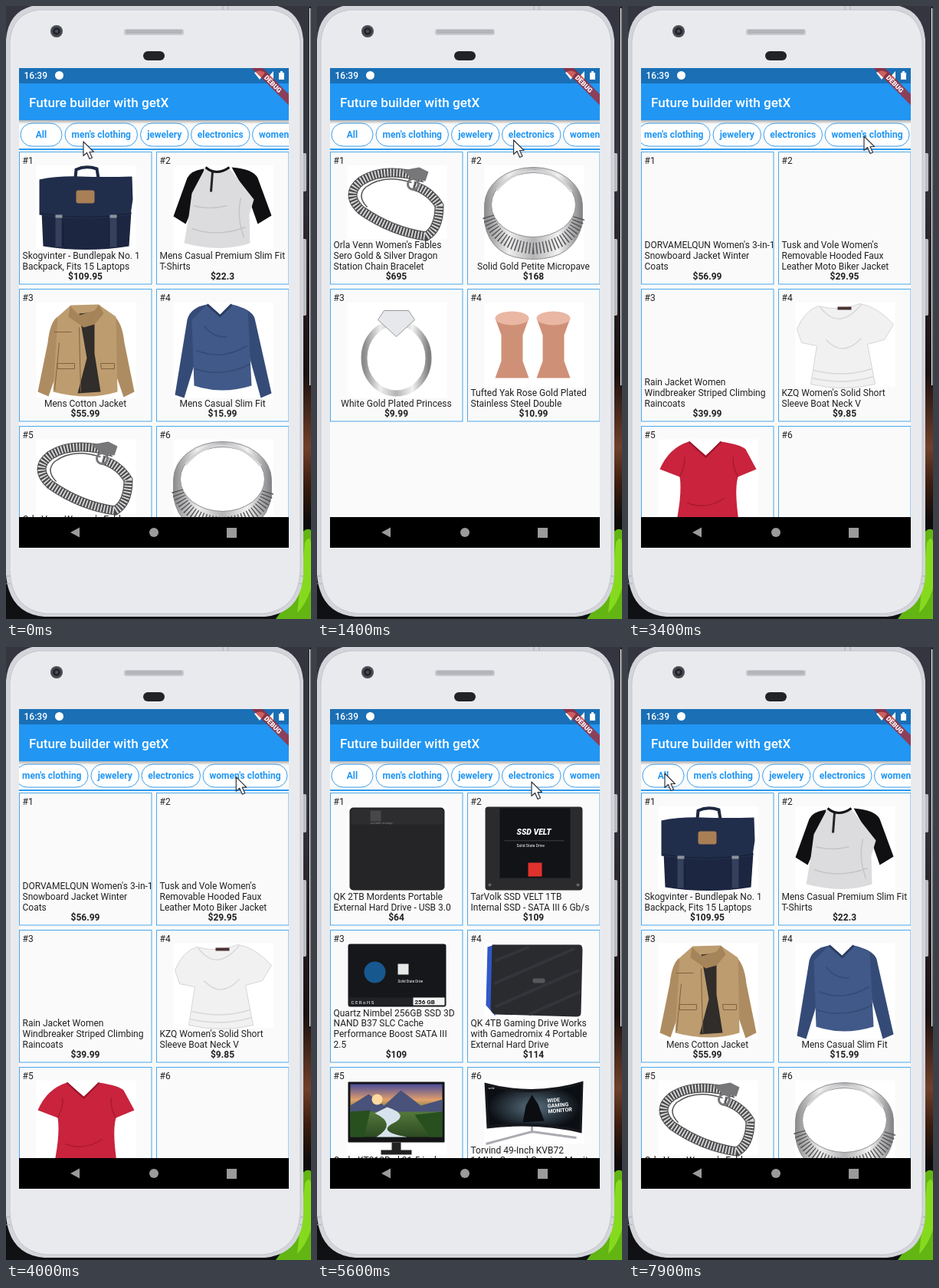
An HTML page that plays this animation: 398x800 px, repeating every 8 s.

```html
<!DOCTYPE html>
<html lang="en">
<head>
<meta charset="utf-8">
<title>Shop grid</title>
<style>
html, body { margin: 0; width: 100%; height: 100%; overflow: hidden; background: #17181c; }
svg { display: block; width: 398px; height: 800px; font-family: Roboto, sans-serif; font-size: 12px; }
.bold { font-weight: 700; }
.mid { text-anchor: middle; }
.card { fill: #fafafa; stroke: #4ba8ec; }
</style>
</head>
<body>
<svg viewBox="0 0 398 800">
  <defs>
    <clipPath id="screen"><rect x="17" y="81" width="352" height="626"/></clipPath>
    <linearGradient id="side" x2="0" y2="1">
      <stop offset="0" stop-color="#34353f"/><stop offset=".25" stop-color="#34353f"/>
      <stop offset=".6" stop-color="#1a1010"/><stop offset=".72" stop-color="#70402a"/>
      <stop offset=".78" stop-color="#3a1d10"/><stop offset=".84" stop-color="#0d0b0a"/><stop offset="1" stop-color="#101114"/>
    </linearGradient>
    <linearGradient id="shade" x2="0" y2="1"><stop stop-color="#000" stop-opacity=".3"/><stop offset="1" stop-color="#000" stop-opacity="0"/></linearGradient>
    <linearGradient id="silver"><stop stop-color="#8b8b8d"/><stop offset=".25" stop-color="#eee"/><stop offset=".5" stop-color="#b4b4b6"/><stop offset=".75" stop-color="#f2f2f2"/><stop offset="1" stop-color="#808083"/></linearGradient>
    <linearGradient id="sky" x2="0" y2="1"><stop stop-color="#4a4b9a"/><stop offset=".3" stop-color="#e3a06a"/><stop offset=".5" stop-color="#567a3c"/><stop offset="1" stop-color="#2c4a22"/></linearGradient>
    <radialGradient id="glow"><stop stop-color="#58707f"/><stop offset="1" stop-color="#0b0e13"/></radialGradient>
  </defs>

  <rect width="398" height="800" fill="url(#side)"/>
  <path d="M396 2H398V496H396" fill="#fff" stroke="#0a0a0a" stroke-width="1.5"/>
  <path d="M386 688Q392 680 398 684V800H352Q384 760 386 688Z" fill="#62b512"/>
  <path d="M390 700Q396 690 398 700V760Q392 780 380 792Z" fill="#86da1e"/>

  <path d="M386 192h4.500q1.500 0 1.500 2v46q0 2-1.500 2H386zM386 304h4.500q1.500 0 1.500 2v96q0 2-1.500 2H386z" fill="#b9bbc1"/>
  <path d="M0 44Q3 8 34 0H354Q385 8 388 44V740Q386 792 338 797H50Q4 793 0 742Z" fill="#d3d5db"/>
  <path d="M5 46Q8 10 42 5H346Q380 9 384 46V738Q381 788 336 793H52Q8 788 5 738Z" fill="#e9eaee" stroke="#c2c4cb"/>
  <path d="M0 744h5M384 744h4M0 754h6M383 754h4M283 0v5M290 0v5" stroke="#a9abb3"/>
  <circle cx="66" cy="33" r="8" fill="#4a4c52"/><circle cx="66" cy="33" r="5" fill="#23252b"/><circle cx="66" cy="33" r="2" fill="#4b5365"/>
  <rect x="154" y="30" width="78" height="8" rx="3" fill="#c8c9ce"/><rect x="156" y="31" width="74" height="5" rx="2" fill="#b4b5bb"/>
  <rect x="179" y="59" width="28" height="12" rx="6" fill="#222326"/>

  <g clip-path="url(#screen)">
    <rect x="17" y="81" width="352" height="626" fill="#fafafa"/>
    <g id="grid"></g>
    <rect x="17" y="149" width="352" height="38" fill="#fafafa"/>
    <g id="chips"></g>
    <rect x="17" y="186" width="352" height="2" fill="#2c9af1"/>
    <rect x="17" y="149" width="352" height="5" fill="url(#shade)"/>
    <rect x="17" y="101" width="352" height="48" fill="#2196f3"/>
    <rect x="17" y="81" width="352" height="20" fill="#1a6fb5"/>
    <g fill="#fff">
      <text x="23.500" y="95" font-weight="500">16:39</text>
      <circle cx="69.500" cy="90.500" r="5.500"/>
      <path d="M324 87q7-5 14 0l-7 9zM349 85v11h-10zM356 87h2v-2h3v2h2v9h-7z"/>
      <text x="30" y="132" font-size="17.140" font-weight="500">Future builder with getX</text>
    </g>
    <g transform="translate(369 81) rotate(45)">
      <rect x="-34" y="24" width="68" height="10.300" fill="#b71c1c" fill-opacity=".7"/>
      <text class="mid" y="32.300" font-size="8.740" font-weight="900" fill="#fff">DEBUG</text>
    </g>
    <rect x="17" y="667" width="352" height="40" fill="#000"/>
    <path d="M84 687L96 680.500V693.500ZM288 681h13v13h-13z" fill="#9b9b9b"/><circle cx="193" cy="687" r="6" fill="#9b9b9b"/>
  </g>
  <path id="cursor" d="M0 0V18.500L4.500 14.500 8 22.500 11.500 21 8 13.500H13.500Z" fill="#fff" stroke="#33343c" stroke-width="1.200" stroke-linejoin="round"/>
</svg>

<script>
const LOOP = 8000, STEP = 100;
const $ = id => document.getElementById(id);
const shape = (d, fill, more = '') => `<path d="${d}" fill="${fill}" ${more}/>`;
const line = (d, color, width = 1, more = '') => shape(d, 'none', `stroke="${color}" stroke-width="${width}" ${more}`);
const box = (x, y, w, h, fill, rx = 0) => `<rect x="${x}" y="${y}" width="${w}" height="${h}" rx="${rx}" fill="${fill}"/>`;
const label = (x, y, text, size, more = '') => `<text x="${x}" y="${y}" font-size="${size}" fill="#fff" ${more}>${text}</text>`;

// Pictures are drawn in card coordinates
const art = {
  bag: line('M73 34L74 23Q87 17 101 22L103 34', '#1d2842', 4) +
    shape('M29 78L31 123Q87 132 143 123L146 78Z', '#1c2640') +
    shape('M26 36Q50 31 80 32T147 32L148 62 145 82Q85 92 26 82Z', '#212e4b') +
    line('M27 80Q85 90 146 80M57 92V122M117 92V122', '#141c31') +
    box(47, 82, 8, 42, '#34405c') + box(118, 82, 9, 42, '#34405c') +
    box(47, 82, 9, 4, '#8d929c') + box(118, 82, 9, 4, '#8d929c') + box(74, 50, 24, 17, '#a97f55', 3),
  raglan: shape('M62 22Q45 24 40 34L22 84 38 94Q46 74 56 58Z', '#101012') +
    shape('M98 20Q126 22 132 34L150 83 132 94 120 60Z', '#101012') +
    shape('M64 20L46 54 42 84 36 119Q85 132 122 119L121 82 127 62 94 20Q78 28 64 20Z', '#dcdcde') +
    line('M64 20Q78 32 95 20', '#151517', 3) + line('M73 26L71 52', '#252528', 3) +
    line('M48 70Q70 76 92 70M46 100Q80 112 116 98M110 60Q104 84 114 112', '#c5c5c8', 1.5),
  jacket: shape('M50 36Q40 42 37 70L24 134 38 140 56 88Z', '#ae8c61') +
    shape('M122 34Q134 42 137 70L150 134 136 141 118 88Z', '#ae8c61') +
    shape('M50 36L67 21 103 20 126 36 128 134Q90 146 44 134Z', '#bd9c70') +
    shape('M78 32L98 30 98 84 106 134 76 136 88 90Z', '#302d2a') +
    shape('M66 22L78 34 98 28 104 20 110 32 98 46 84 50 64 36Z', '#a58459') +
    line('M45 56H68M49 97H72V104H50ZM106 97H124V104H107ZM52 70L46 132M78 50L80 134', '#7f623f'),
  sweater: shape('M66 20Q44 24 40 40L24 138 36 142 58 70Z', '#354b77') +
    shape('M98 20Q124 26 128 38L150 136 136 142 116 70Z', '#354b77') +
    shape('M66 20L83 34 98 20 119 28 124 126Q85 138 49 126L46 40Z', '#405988') +
    line('M66 20L83 35 98 20', '#2a3c62', 3) +
    line('M52 80Q85 94 118 74M50 104Q85 116 122 98M62 48Q74 64 92 62', '#344a75', 1.500),
  bracelet: ['#4c4c4e', '#d9d9da'].map((c, i) =>
    line('M123 34Q70 18 40 38Q18 55 40 76Q80 104 125 110Q142 100 142 70Q130 50 108 44', c, 12 - 2 * i, i ? 'stroke-dasharray="1.800 2.200"' : '')).join('') +
    line('M106 40Q70 28 46 46Q34 58 48 72', '#555', 1.500) + '<circle cx="108" cy="42" r="7" fill="none" stroke="#77777a" stroke-width="3"/>' +
    shape('M94 24L116 20 128 26 124 38 106 34Z', '#77777a'),
  ring: shape('M22 70A64 50 0 0 1 150 70V92Q140 140 86 140Q30 140 22 92Z', 'url(#silver)', 'stroke="#8d8d90"') +
    '<ellipse cx="86" cy="69" rx="55" ry="42" fill="#fff" stroke="#8f8f92"/>' +
    line('M27 84Q38 122 86 126Q136 122 146 84', '#58585b', 15, 'stroke-dasharray="1.500 3"') +
    line('M38 50Q60 24 86 25Q114 25 136 52', '#d4d4d6', 3),
  gem: '<ellipse cx="86" cy="90" rx="42" ry="46" fill="none" stroke="url(#silver)" stroke-width="8"/>' +
    shape('M70 28H102L110 40 86 62 62 40Z', '#e6e8ec', 'stroke="#98989c"'),
  plugs: [58, 112].map(x => shape(`M${x - 22} 38h44l-8 22v34l8 22h-44l8-22V60z`, '#cf9078') +
    `<ellipse cx="${x}" cy="38" rx="22" ry="9" fill="#e9b7a3"/>`).join(''),
  whiteTee: shape('M52 22Q34 28 24 52L30 70 50 74 42 124Q85 134 126 124L116 72 138 66 150 46Q128 22 106 19Q80 30 52 22Z', '#f1f1f2', 'stroke="#d6d6d8"') +
    line('M54 23Q78 56 108 20M46 106Q84 116 122 104M44 116Q84 126 124 114M62 66Q84 90 108 64', '#d8d8da', 1.500) + box(77, 23, 18, 4, '#4a3332'),
  redTee: shape('M62 20L84 38 104 20Q130 24 136 30L150 56 126 66Q120 86 130 142H42Q54 90 50 66L24 56Q36 28 62 20Z', '#c9233d') +
    line('M62 20L84 40 104 20', '#99152b', 2) + line('M50 66Q58 50 56 40M126 66Q118 52 120 40M60 100Q84 110 108 94', '#aa1a31', 1.500),
  drive: box(25, 19, 124, 108, '#252527', 5) + box(27, 21, 120, 20, '#2d2d30', 3) + box(52, 23, 14, 14, '#47474a') + label(52, 40, 'portable storage', 4, 'opacity=".4"'),
  ssd: box(23, 18, 127, 109, '#2b2b2e', 4) + box(42, 20, 92, 91, '#121316') +
    '<circle cx="29" cy="120" r="2" fill="#666"/><circle cx="144" cy="120" r="2" fill="#666"/>' +
    label(64, 54, 'SSD VELT', 10.500, 'font-weight="800" font-style="italic"') + label(64, 70, 'Solid State Drive', 5) +
    box(48, 62, 78, .7, '#555') + box(79, 91, 18, 18, '#e0322d'),
  ssd256: box(23, 18, 128, 82, '#15171a', 3) + '<circle cx="58" cy="55" r="14" fill="#17588f"/>' +
    box(88, 44, 14, 14, '#e8e8e8') + label(88, 68, 'Solid State Drive', 4.500) + box(24, 88, 126, 10, '#202225') +
    box(108, 88, 41, 10, '#f4f4f4') + label(110, 96.500, '256 GB', 8, 'class="bold" style="fill:#111"') + label(27, 96, 'C E  R o H S', 6),
  gameDrive: shape('M26 22L36 19V112L24 98Z', '#3157c9') + shape('M32 19H146Q150 19 150 26L148 108Q148 113 142 113L36 110Q30 108 30 100Z', '#2a2b2e') +
    line('M36 40L80 22M34 70L140 24M36 100L146 52M80 110L148 80', '#34353a', 4) + box(85, 63, 16, 6, '#56575b', 2),
  monitor: box(23, 19, 126, 79, '#141416', 1) + box(26, 22, 120, 69, 'url(#sky)') +
    shape('M26 50L50 35 70 50 92 30 118 50 146 42V58H26Z', '#49527a') + shape('M74 52Q104 62 82 73T100 91H60Q88 74 58 60Z', '#d7e3ec') +
    '<circle cx="61" cy="42" r="7" fill="#ffd9a0"/>' + shape('M26 58L52 56 44 91H26ZM146 58L110 62 130 91H146Z', '#28501f') +
    shape('M80 98H92V108H106V114H66V108H80Z', '#222'),
  wideMonitor: line('M24 100L84 84 142 92M84 72V86', '#aaaab0', 3) + shape('M22 20Q86 38 151 18L149 86Q90 72 25 80Z', '#16181d') +
    shape('M25 24Q86 42 148 22L146 82Q90 68 28 76Z', 'url(#glow)') +
    shape('M72 72L76 50 84 36 92 48 100 70Z', '#0b0d10') + label(27, 28, 'wide', 4) +
    ['WIDE', 'GAMING', 'MONITOR'].map((t, i) => label(104, 46 + i * 7, t, 7, 'font-weight="700" transform="rotate(-5 104 46)"')).join('')
};

const product = (pic, price, ...lines) => ({ pic, price, lines });
const mens = [
  product('bag', '109.95', 'Skogvinter - Bundlepak No. 1', 'Backpack, Fits 15 Laptops'),
  product('raglan', '22.3', 'Mens Casual Premium Slim Fit', 'T-Shirts'),
  product('jacket', '55.99', 'Mens Cotton Jacket'),
  product('sweater', '15.99', 'Mens Casual Slim Fit')
];
const jewelery = [
  product('bracelet', '695', "Orla Venn Women's Fables", 'Sero Gold & Silver Dragon', 'Station Chain Bracelet'),
  product('ring', '168', 'Solid Gold Petite Micropave'),
  product('gem', '9.99', 'White Gold Plated Princess'),
  product('plugs', '10.99', 'Tufted Yak Rose Gold Plated', 'Stainless Steel Double')
];
const electronics = [
  product('drive', '64', 'QK 2TB Mordents Portable', 'External Hard Drive - USB 3.0'),
  product('ssd', '109', 'TarVolk SSD VELT 1TB', 'Internal SSD - SATA III 6 Gb/s'),
  product('ssd256', '109', 'Quartz Nimbel 256GB SSD 3D', 'NAND B37 SLC Cache', 'Performance Boost SATA III', '2.5'),
  product('gameDrive', '114', 'QK 4TB Gaming Drive Works', 'with Gamedromix 4 Portable', 'External Hard Drive'),
  product('monitor', '599', 'Ondo KT310R ul 21.5 inches', 'Full HD Widescreen', 'Ultra-Thin'),
  product('wideMonitor', '999.99', 'Torvind 49-Inch KVB72', '144Hz Curved Gaming Monitor', 'Super Ultrawide', 'Screen')
];
const womens = [
  product('', '56.99', "DORVAMELQUN Women's 3-in-1", 'Snowboard Jacket Winter', 'Coats'),
  product('', '29.95', "Tusk and Vole Women's", 'Removable Hooded Faux', 'Leather Moto Biker Jacket'),
  product('', '39.99', 'Rain Jacket Women', 'Windbreaker Striped Climbing', 'Raincoats'),
  product('whiteTee', '9.85', "KZQ Women's Solid Short", 'Sleeve Boat Neck V'),
  product('redTee', '7.95', "Women's Short Sleeve"),
  product('', '12.99', 'Womens T Shirt Casual')
];
const views = [[...mens, ...jewelery.slice(0, 2)], mens, jewelery, electronics, womens];

function card({ pic, price, lines }, i) {
  const n = lines.length, x = i % 2 ? 196.5 : 17.5, y = 190.5 + 179 * (i >> 1);
  const title = lines.map((t, k) =>
    `<text x="${n > 1 ? 4 : 86}" y="${153.5 - 13.8 * (n - 1 - k)}" ${n > 1 ? '' : 'class="mid"'}>${t.replace('&', '&amp;')}</text>`).join('');
  const picture = pic && `<g class="${pic}">${box(22, 17, 130, 139 - 14 * n, '#fff')}${art[pic]}</g>`;
  return `<g transform="translate(${x} ${y})" fill="#212121"><rect class="card" width="172.500" height="172.500"/>
    ${picture}<text x="4" y="15">#${i + 1}</text>${title}<text class="bold mid" x="86" y="166.500">$${price}</text></g>`;
}
$('grid').innerHTML = views.map(v => `<g>${v.map(card).join('')}</g>`).join('');

const chips = [['All', 19, 54], ["men's clothing", 77, 94.5], ['jewelery', 175.5, 62.5], ['electronics', 241.5, 76.5], ["women's clothing", 321.5, 110]];
$('chips').innerHTML = chips.map(([name, x, w]) =>
  `<rect x="${x}" y="153" width="${w}" height="30" rx="15" stroke="#3c9fef"/>
   <text class="bold mid" x="${x + w / 2}" y="172" fill="#2196f3">${name}</text>`).join('');

const panes = [...$('grid').children], pills = [...$('chips').querySelectorAll('rect')];
const tees = ['whiteTee', 'redTee'].map(c => document.querySelector('.' + c));

// [time, view]
const switches = [[0, 0], [500, 1], [1150, 2], [1700, 3], [2200, 4], [4600, 3], [6300, 2], [6900, 1], [7500, 0]];
// [time, x, y]
const moves = [[0, 101, 177], [400, 108, 175], [800, 199, 175], [1200, 201, 175], [1500, 276, 175], [1800, 280, 176], [2100, 347, 178],
  [2600, 347, 178], [3000, 283, 174], [3400, 308, 170], [3900, 308, 170], [4400, 234, 167], [4850, 234, 167], [5250, 298, 174],
  [5600, 280, 176], [5800, 276, 176], [6150, 205, 174], [6500, 203, 174], [6800, 122, 171], [7100, 118, 170], [7400, 48, 165], [8000, 48, 165]];
const scrolls = [[0, 0], [2600, 0], [3000, -64.5], [4850, -64.5], [5250, 0], [8000, 0]];

function sample(keys, t) {
  const k = keys.findIndex(key => key[0] > t), a = keys[k - 1], b = keys[k];
  const u = (t - a[0]) / (b[0] - a[0]), e = u * u * (3 - 2 * u);
  return a.slice(1).map((v, i) => v + (b[i + 1] - v) * e);
}

function render(t) {
  const view = switches.filter(s => s[0] <= t).pop()[1];
  panes.forEach((p, i) => p.style.display = i === view ? '' : 'none');
  tees.forEach((p, i) => p.style.display = t >= 2900 + 200 * i ? '' : 'none');
  pills.forEach((p, i) => {
    const pressed = switches.some(([at, v]) => at && v === i && t >= at - 150 && t <= at + 150);
    p.setAttribute('fill', pressed ? '#e2f0fb' : '#fff');
  });
  $('chips').setAttribute('transform', `translate(${sample(scrolls, t)[0]} 0)`);
  $('cursor').setAttribute('transform', `translate(${sample(moves, t)})`);
}

function frame() {
  render(Math.floor(performance.now() % LOOP / STEP) * STEP);
  requestAnimationFrame(frame);
}
frame();
</script>
</body>
</html>
```
